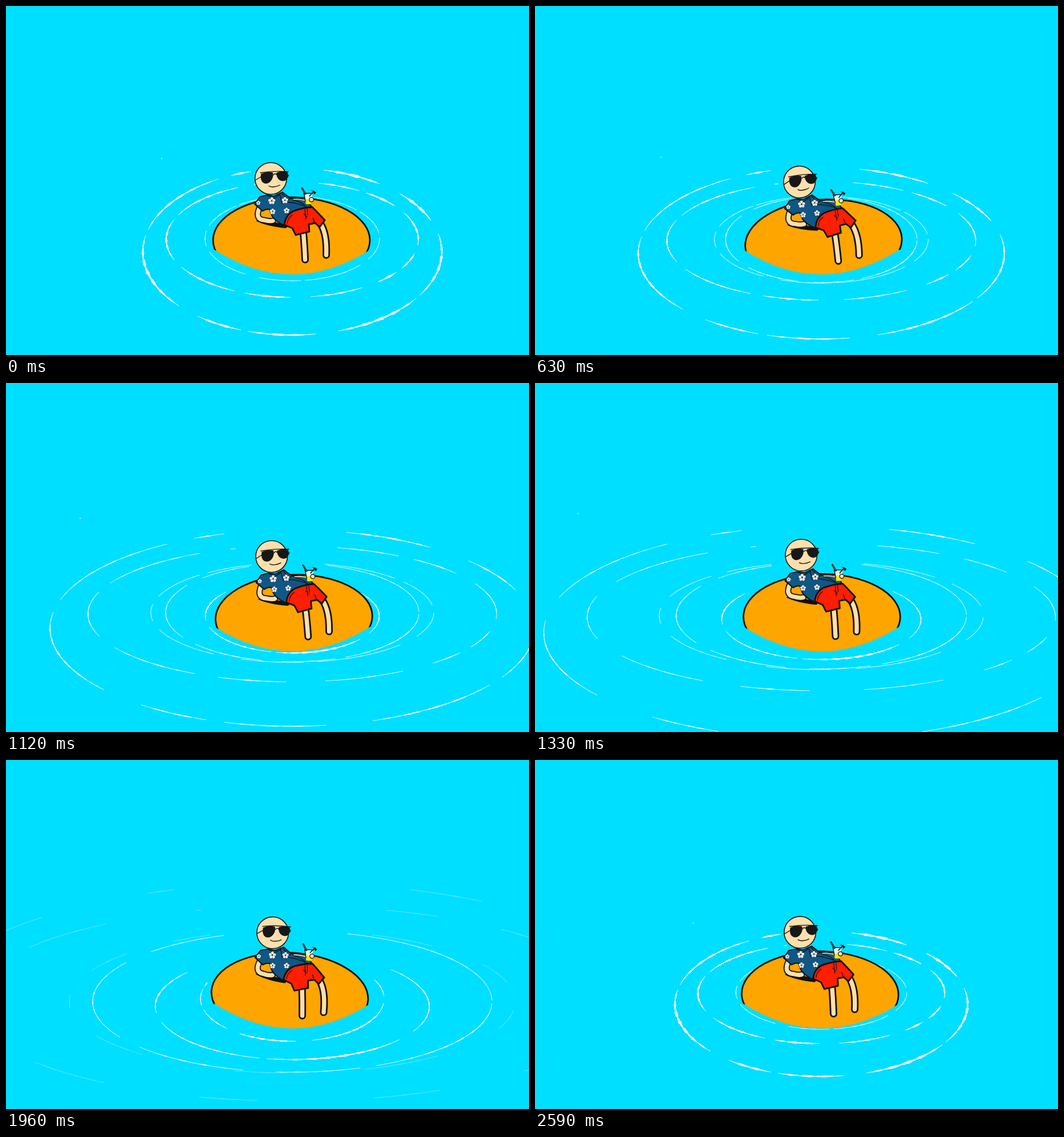
Write an HTML page with a canvas that moves like this. It is 917 px wide and 611 px high and loops after 2.66 s.

```html
<!DOCTYPE html>
<html lang="en">
<head>
<meta charset="utf-8">
<title>Island nap</title>
<style>
  html, body { margin: 0; width: 100%; height: 100%; overflow: hidden; background: #00dfff; }
  canvas, svg { position: absolute; left: 0; top: 0; width: 917px; height: 611px; }
  .ink, .skin { fill: none; stroke: #111; stroke-linecap: round; stroke-linejoin: round; }
  .skin { stroke: #ffdfac; }
  .line { stroke: #111; stroke-linejoin: round; stroke-linecap: round; }
</style>
</head>
<body>
<canvas id="water" width="917" height="611"></canvas>
<svg viewBox="0 0 917 611">
  <defs>
    <clipPath id="shore"><path d="M0 0H917V427H638Q502 513 366 427H0Z"/></clipPath>
    <path id="arm" d="M445 352C439 365 440 374 453 375C460 377 464 377 468 376"/>
    <path id="leg1" d="M521 394Q523 412 524.5 444"/>
    <path id="leg2" d="M552 382Q563 400 561.5 436"/>
    <g id="flower">
      <g fill="#fff" stroke="#111" stroke-width=".5">
        <circle cy="-3.6" r="2.8"/><circle cx="3.6" cy="-.8" r="2.8"/><circle cx="2.2" cy="3.3" r="2.8"/>
        <circle cx="-2.2" cy="3.3" r="2.8"/><circle cx="-3.6" cy="-.8" r="2.8"/>
      </g>
      <circle r="2.2" fill="#fff"/><circle r="1.5" fill="#14344c"/>
    </g>
  </defs>
  <g clip-path="url(#shore)">
    <g id="isle">
      <ellipse class="line" cx="500.5" cy="410" rx="137.5" ry="75" fill="#ffa500" stroke-width="2.8"/>
      <path d="M438 376Q455 372 495 385L491 389Q458 386 438 376Z" fill="#111"/>

      <use href="#leg1" class="ink" stroke-width="13"/><use href="#leg1" class="skin" stroke-width="7.4"/>
      <use href="#leg2" class="ink" stroke-width="13"/><use href="#leg2" class="skin" stroke-width="7.4"/>
      <use href="#arm" class="ink" stroke-width="11"/><use href="#arm" class="skin" stroke-width="7.4"/>

      <path class="line" stroke-width="2" fill="#0f5785" d="M436 347L445 334L458 331L470 333L485 326L499 337L519 338Q532 343 536 352Q510 356 503 360Q491 368 488 384Q473 378 466 367L462 356Q456 355 450 359Z"/>
      <path class="skin" stroke-width="1.6" d="M504 338.500Q518 337 531 343"/>
      <path class="ink" stroke-width="1.3" d="M457 331L470 337L480 330L484 345L498 338M484 328L493 338M490 343Q512 344 530 353M503 340Q516 342 524 349"/>
      <use href="#flower" transform="translate(466 341)"/>
      <use href="#flower" transform="translate(489 340) scale(.9)"/>
      <use href="#flower" transform="translate(467.500 359.500) scale(.8)"/>
      <use href="#flower" transform="translate(492 358) scale(.8)"/>
      <use href="#flower" transform="translate(442.500 344.500) scale(.6)"/>

      <path class="line" stroke-width="2.8" fill="#ff1e00" d="M488 383Q490 366 504 359Q520 353 537 352L545 360L559 375L550 387L542 380L531 382L532 395L508 401L502 389Z"/>
      <path class="ink" stroke-width="1.2" d="M493 381Q494 371 502 366M524 356L526 373M528 355L529 366M522 364L528 369M541 379L538 371"/>

      <path d="M523 329H537L534.500 347H526Z" fill="#d9f6ff"/>
      <path d="M524.500 338H535.500L534.500 347H526Z" fill="#ffe800"/>
      <path class="ink" stroke-width="1.4" d="M522 328H538M522.500 329L525 342"/>
      <path class="ink" stroke-width="3" d="M519 319L525 329"/>
      <path d="M519 319L525 329" stroke="#f34b45" stroke-width="1.1"/>
      <path class="ink" stroke-width="1.6" d="M532 333L540 324"/>
      <path d="M534 322L544 326L541 330L538 325Z" fill="#111"/>
      <circle cx="535.500" cy="339" r="3.800" fill="#ffdfac" class="line" stroke-width="1.3"/>

      <circle cx="464.300" cy="302" r="27.800" fill="#ffdfac" class="line" stroke-width="1.6"/>
      <path class="ink" stroke-width="1.4" d="M437 305L447 299M446 292Q470 288 495 290M469 296Q471 292 474 295M494 299L495.500 296"/>
      <g fill="#171717">
        <path d="M447 294Q457 289 468 291.500Q470 301 463 308Q458 312.500 452 310Q445 306 447 294Z"/>
        <path d="M474 292Q484 287.500 493.500 290.500Q496 299 492 304Q487 308.500 480 305Q474 301 474 292Z"/>
      </g>
      <path class="ink" stroke-width="1.4" d="M461 315Q465 317.500 470 316.500Q476 316 480 313.500"/>
    </g>
  </g>
</svg>
<script>
const LOOP = 2660, STEP = 70, CX = 502;
const ctx = document.getElementById('water').getContext('2d');
const isle = document.getElementById('isle');

const ramp = (t, a, b) => Math.min(1, Math.max(0, (t - a) / (b - a)));
const ease = u => u * u * (3 - 2 * u);

// Linear path through a few [time, value] points
function through(points, t) {
  const i = points.findIndex(p => p[0] > t);
  if (i < 0) return points.at(-1)[1];
  if (i === 0) return points[0][1];
  const [[t0, v0], [t1, v1]] = points.slice(i - 1, i + 1);
  return v0 + (v1 - v0) * ramp(t, t0, t1);
}

function seeded(seed) {
  return () => (seed = seed * 16807 % 2147483647) / 2147483647;
}

// Brush dashes around a ring, leaving `open` degrees free on both sides of the top
function dashes(seed, open, span, weight) {
  const rnd = seeded(seed * 7919), list = [];
  const end = 628 - open;
  for (let a = 268 + open; a < end;) {
    const b = Math.min(end, a + span * (.4 + 1.2 * rnd()));
    list.push({ a, b, w: weight * (.55 + .45 * rnd()) });
    a = b + 2 + 9 * rnd();
  }
  return list;
}

// Sizes at unit scale; each ring appears at `born` and fades after `hold`
const rings = [
  { rx: 262, ry: 146, dy: 23, born: -500, hold: 0, marks: dashes(3, 14, 38, 4.8) },
  { rx: 221, ry: 101, dy: 2, born: -500, hold: 0, marks: dashes(5, 14, 26, 4) },
  { rx: 153, ry: 74, dy: 0, born: -500, hold: 0, marks: dashes(8, 14, 36, 1.5) },
  { rx: 137, ry: 73, dy: 0, born: 280, hold: 1960, marks: dashes(11, 18, 60, 2) },
  { rx: 94, ry: 55, dy: 5, born: 770, hold: 1960, marks: dashes(14, 48, 50, 3.8) },
  { rx: 63, ry: 44, dy: -3, born: 1610, hold: 1960, marks: dashes(17, 65, 50, 3.4) }
];
const swell = [[0, 407], [210, 403], [630, 409], [1120, 402], [1540, 413], [1960, 423]];
const heave = [[0, 0], [600, 4.1], [1540, -2], [1960, 2.3], [2590, 0]];

function stroke(cx, cy, rx, ry, from, to, weight) {
  const n = Math.max(12, Math.ceil((to - from) * rx / 250)), back = [];
  ctx.beginPath();
  for (let i = 0; i <= n; i++) {
    const u = i / n, deg = from + (to - from) * u, a = deg * Math.PI / 180;
    const rough = .8 + .3 * Math.sin(deg * .9) + .2 * Math.sin(deg * 2.3);
    const h = Math.max(.4, weight * Math.sin(Math.PI * u) ** .6 * rough / 2);
    const c = Math.cos(a), s = Math.sin(a);
    ctx.lineTo(cx + (rx + h) * c, cy + (ry + h) * s);
    back.unshift([cx + (rx - h) * c, cy + (ry - h) * s]);
  }
  back.forEach(p => ctx.lineTo(...p));
  ctx.fill();
}

// All rings spread together: wide first, then also in depth
function drawWave(t, squash) {
  const s = Math.max(0, t) / 1000;
  const sx = Math.exp(.0003 * t + .35 * ease(ramp(t, 450, 1950)));
  const sy = squash * (1 + .18 * s * s - .05 * Math.sin(s * 1.6));
  const cy = through(swell, t);

  for (const { rx, ry, dy, born, hold, marks } of rings) {
    const power = ramp(t, born, born + 350) * (1 - ramp(t, hold, 2450));
    if (power <= 0) continue;
    const len = Math.min(1, .25 + 1.25 * power);
    ctx.globalAlpha = Math.min(1, power * 2.2);
    for (const { a, b, w } of marks) {
      const mid = (a + b) / 2, half = (b - a) / 2 * len;
      stroke(CX, cy + dy * sy, rx * sx, ry * sy, mid - half, mid + half, Math.max(1, w * power));
    }
  }
  ctx.globalAlpha = .8 * ramp(t, -500, -150) * (1 - ramp(t, 1540, 1700));
  ctx.fillRect(CX - 230 * sx, cy - 141 * sy, 1.6, 2);
}

function draw(now) {
  const t = Math.floor(now % LOOP / STEP) * STEP;
  ctx.clearRect(0, 0, 917, 611);
  ctx.fillStyle = '#fff';
  drawWave(t, 1);
  drawWave(t - LOOP, .87);

  const w = t / LOOP * 2 * Math.PI;
  const turn = -3.3 * Math.sin(w);
  const x = 4.3 * Math.sin(w) + 1.2 * (1 - Math.cos(w));
  isle.setAttribute('transform', `translate(${x} ${through(heave, t)}) rotate(${turn} 500 410)`);
}

const start = performance.now();
function tick() {
  draw(performance.now() - start);
  requestAnimationFrame(tick);
}
tick();
</script>
</body>
</html>
```
